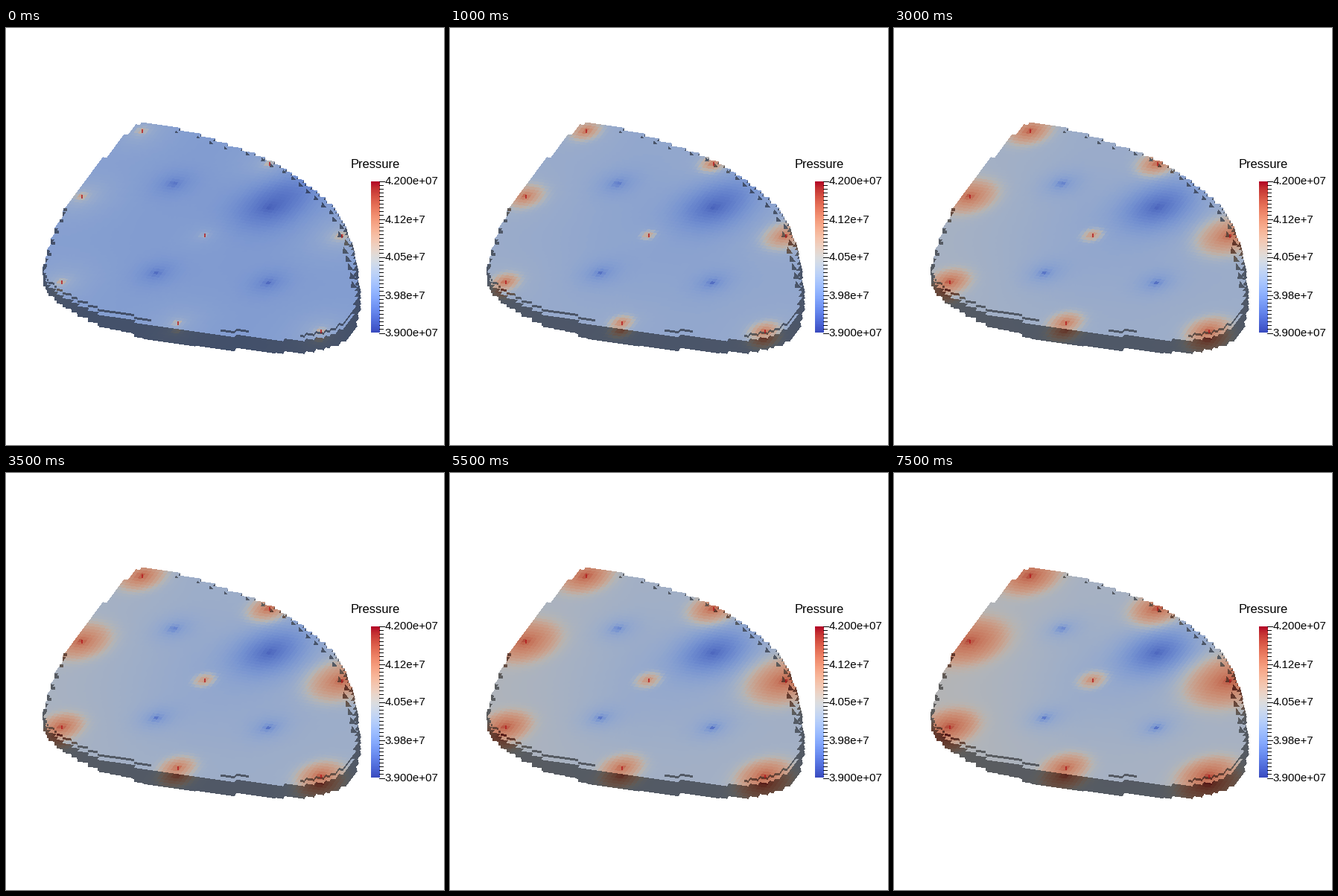
Recreate the animation shown at these times as a matplotlib script. Size 588 by 560 pixels, loop 8000 ms.

```python
import numpy as np
import matplotlib.pyplot as plt
from matplotlib.animation import FuncAnimation
from matplotlib.path import Path

W, H, FRAMES, STEP = 588, 560, 16, 500
END = (FRAMES - 1) * STEP / 1000
TOP, WALL = 0.82, 0.42            # light on upper and side faces
CELL = np.array([[5.2, 2.6], [0.74, -3.5]])   # grid axes in pixels
INV = np.linalg.inv(CELL)
CMAP = plt.get_cmap("coolwarm")

# key points of the rim, clockwise
RIM = [(188, 127), (242, 138), (294, 155), (338, 171), (370, 187),
       (425, 227), (451, 262), (466, 305), (468, 377), (437, 412),
       (372, 419), (288, 411), (195, 398), (118, 381), (60, 348),
       (52, 325), (68, 268), (100, 213), (161, 143)]
# x, y, final radius
INJECTORS = [(182, 138, 46), (353, 182, 40), (101, 226, 57), (450, 279, 65),
             (74, 341, 43), (230, 396, 36), (422, 407, 47), (266, 278, 21)]
PRODUCERS = [(225, 209), (202, 329), (352, 342)]

Y, X = np.mgrid[0:H, 0:W] + 0.5


def smooth_loop(points, n=8):
    """Closed Catmull-Rom curve through the points."""
    p1 = np.array(points, float)
    p0, p2, p3 = (np.roll(p1, k, 0) for k in (1, -1, -2))
    s = np.linspace(0, 1, n, endpoint=False)[:, None, None]
    curve = (2 * p1 + (p2 - p0) * s + (2 * p0 - 5 * p1 + 4 * p2 - p3) * s ** 2
             + (3 * (p1 - p2) + p3 - p0) * s ** 3) / 2
    return curve.transpose(1, 0, 2).reshape(-1, 2)


def to_grid(x, y):
    return INV[0, 0] * x + INV[0, 1] * y, INV[1, 0] * x + INV[1, 1] * y


def inside(points, x=X, y=Y):
    pts = np.column_stack([x.ravel(), y.ravel()])
    return Path(points).contains_points(pts).reshape(x.shape)


def build_shade():
    """Brightness of each pixel, zero where there is no body."""
    u, v = (np.floor(g) + 0.5 for g in to_grid(X, Y))
    top = inside(smooth_loop(RIM), CELL[0, 0] * u + CELL[0, 1] * v,
                 CELL[1, 0] * u + CELL[1, 1] * v)
    depth = np.interp(X, [50, 200, 470], [11, 21, 16])
    wall = np.zeros_like(top)
    for k in range(1, 23):
        down = np.roll(top, k, 0)
        right = np.roll(down, k // 4, 1) & (X > 440)
        wall |= (down | right) & (k <= depth)
    shade = np.where(top, TOP, np.where(wall, WALL, 0))

    # riser of the ledge that runs along parts of the front
    front = H - np.argmax(top[::-1], axis=0)
    rise = front - Y
    ledge = (X < 195) | (abs(X - 307) < 19) | (X > 395)
    shade[top & ledge & (Y > 335) & (rise > 5) & (rise < 8)] = WALL

    # teeth down the right rim, notches down the left one
    right_end = W - np.argmax(top[:, ::-1], axis=1)
    left_end = np.argmax(top, axis=1)
    y = 137
    while y < 350:
        w, h = 4 + (y - 137) / 50, 4 + (y - 137) / 32
        x = right_end[int(y)] - w
        shade[inside([(x, y), (x - 1, y + h), (x + w, y + h)])] = WALL
        y += 7 + (y - 137) / 40
    for y in range(244, 336, 15):
        shade[(abs(Y - y) < 2) & (X > left_end[y]) & (X < left_end[y] + 5)] = WALL
    return shade


SHADE = build_shade()
BODY, SIDE = SHADE > 0, SHADE == WALL
GU, GV = (np.floor(g) + 0.5 for g in to_grid(X, Y - 10 * SIDE))


def distance(x, y):
    u, v = to_grid(x, y)
    return 5.8 * np.hypot(GU - u, GV - v)


R_IN = [distance(x, y) for x, y, _ in INJECTORS]
R_OUT = [distance(*w) for w in PRODUCERS]
R_SINK, R_EDGE, R_MID = distance(354, 241), distance(385, 216), distance(300, 275)
LEFT = np.clip((250 - X) / 200, 0, 1)


def bell(r, width):
    return np.exp(-(r / width) ** 2)


def pressure(t):
    g = (t / END) ** .45
    p = .30 + .14 * g + (.01 + .05 * g) * LEFT - (.01 + .05 * g) * bell(R_MID, 130)
    for r in R_OUT:
        p -= (.13 + .1 * g) * np.exp(-r / 5) + .06 * bell(r, 30)
    p -= .07 * np.exp(-R_SINK / 8) + (.13 + .08 * g) * bell(R_SINK, 50)
    p -= .06 * (1 - .7 * g) * bell(R_EDGE, 40)
    age = max(t, .04) / END
    for (_, _, size), r in zip(INJECTORS, R_IN):
        reach = size * age ** .35
        level = min(.82, .5 + .0075 * size)
        edge = 1 / (1 + np.exp(np.clip((r - reach) / (.14 * reach), -40, 40)))
        bump = .42 * edge + .58 * np.clip(1 - r / reach, 0, 1)
        p += .0022 * size * (1 - g) * np.exp(-r / 28)
        p += (level - p) * bump * (.3 + .7 * g ** .5)
        p += .12 * np.exp(-r / 4)
    return np.where(SIDE, p + .25 * np.clip(p - .55, 0, 1), p)


def render(t):
    rgb = CMAP(np.clip(pressure(t), 0, 1))[..., :3] * SHADE[..., None]
    rgb[~BODY] = 1
    return rgb


fig = plt.figure(figsize=(W / 100, H / 100), dpi=100, facecolor="white")
ax = fig.add_axes([0, 0, 1, 1])
ax.axis("off")
view = ax.imshow(render(0), extent=(0, W, H, 0), interpolation="nearest")

for x, y, _ in INJECTORS:
    ax.plot([x + .5, x + .5], [y - 2.5, y + 2.5], color="#b4181c", lw=1.1,
            solid_capstyle="butt")


def label(x, y, text, px):
    ax.text(x, y, text, fontsize=px * .72, family="Liberation Sans",
            color="black", va="center_baseline")


ax.imshow(np.linspace(1, 0, 256)[:, None], cmap=CMAP, aspect="auto",
          extent=(490, 502, 409, 206), interpolation="bilinear")
for k in range(41):
    y = 205.5 + 5.1 * k
    ax.plot([501, 508 if k % 10 == 0 else 506], [y, y], color="black", lw=.7)
for k, text in enumerate(["4.200e+07", "4.12e+7", "4.05e+7", "3.98e+7", "3.900e+07"]):
    label(508.5, 205 + 51 * k, text, 15)
label(463, 182.5, "Pressure", 16.5)
ax.set(xlim=(0, W), ylim=(H, 0))


def update(i):
    view.set_data(render(i * STEP / 1000))
    return [view]


anim = FuncAnimation(fig, update, frames=FRAMES, interval=STEP,
                     repeat=True, repeat_delay=0)
plt.show()
```
